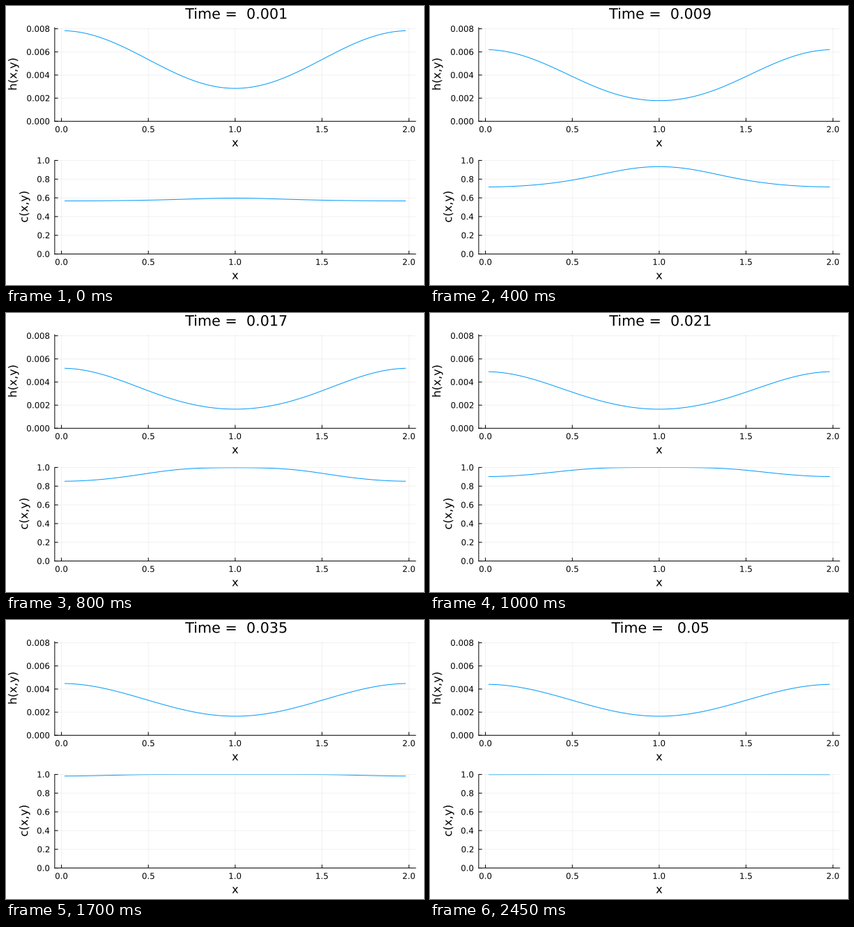
Recreate the animation shown at these times as a matplotlib script. Size 600 by 400 pixels, loop 2.5 s.

```python
import numpy as np
import matplotlib.pyplot as plt
from matplotlib.animation import FuncAnimation
from matplotlib.patches import PathPatch
from matplotlib.path import Path
from matplotlib.textpath import TextPath
from matplotlib.transforms import Affine2D

W, H, DPI = 600, 400, 100
PX = 72 / DPI  # points per pixel
STEPS = 50
RATE, C0, LAG = 0.57e-3, 0.55, 0.35
LEFT, RIGHT = 69.9, 588.0
MIDDLE = (LEFT + RIGHT) / 2
X_MIN, X_MAX = -0.0388, 2.0388
TICK = 4.8

plt.rcParams.update({"font.family": "DejaVu Sans", "path.snap": False})


def evaporate(x):
    """Film height and concentration per step; the solute stays in place."""
    h = 0.0055 + 0.0025 * np.cos(np.pi * x)
    solute = C0 * h
    c = np.full_like(x, C0)
    heights, concs = [], []
    for _ in range(STEPS):
        before = solute / c
        c = c + RATE * (1 - c) * c / h
        h = (1 - LAG) * solute / c + LAG * before
        heights.append(h)
        concs.append(c)
    return heights, concs


fig = plt.figure(figsize=(W / DPI, H / DPI), dpi=DPI, facecolor="white")


def set_label(patch, x, y, s, size, anchor=0.5, angle=0):
    """Outline text on baseline y; anchor 0.5 centres it, 1 aligns it right."""
    path = TextPath((0, 0), s, size=size)
    box = path.get_extents()
    patch.set_path(path)
    patch.set_transform(Affine2D().translate(-box.x0 - anchor * box.width, 0)
                        .rotate_deg(angle).translate(x, H - y))


def label(*args, **kwargs):
    patch = PathPatch(Path([(0, 0)]), facecolor="black", linewidth=0)
    set_label(patch, *args, **kwargs)
    return fig.add_artist(patch)


def panel(top, bottom, ymax, yticks, fmt, name, name_x):
    width, height = RIGHT - LEFT, bottom - top
    xticks = np.arange(0, 2.1, 0.5)
    ax = fig.add_axes([LEFT / W, 1 - bottom / H, width / W, height / H])
    ax.set_facecolor("none")
    ax.set_xticks(xticks)
    ax.set_yticks(yticks)
    ax.tick_params(length=0, labelbottom=False, labelleft=False)
    ax.grid(color="black", alpha=0.055, linewidth=PX)
    ax.set_axisbelow(True)
    ax.spines[["top", "right"]].set_visible(False)
    ax.spines[["left", "bottom"]].set_linewidth(PX)
    ax.vlines(xticks, 0, TICK / height, color="black", linewidth=PX,
              transform=ax.get_xaxis_transform(), clip_on=False)
    ax.hlines(yticks, 0, TICK / width, color="black", linewidth=PX,
              transform=ax.get_yaxis_transform(), clip_on=False)
    line, = ax.plot([], [], color="#009AFA", linewidth=PX)
    line.set_clip_path(Path.unit_rectangle(), ax.transAxes)
    ax.set_xlim(X_MIN, X_MAX)
    ax.set_ylim(0, ymax)

    for v in xticks:
        px = LEFT + (v - X_MIN) / (X_MAX - X_MIN) * width
        label(px, bottom + 15.6, f"{v:.1f}", 11.8)
    for v in yticks:
        label(62.2, bottom - v / ymax * height + 4.3, format(v, fmt), 11.8,
              anchor=1)
    label(MIDDLE, bottom + 36, "x", 16.2)
    label(name_x, (top + bottom) / 2 - 0.6, name, 16.2, angle=90)
    return line


x = np.linspace(0.02, 1.98, 99)
heights, concs = evaporate(x)
h_line = panel(31.0, 165.3, 0.0081, np.arange(5) * 0.002, ".3f", "h(x,y)", 15.2)
c_line = panel(221.4, 355.6, 1.0, np.arange(6) * 0.2, ".1f", "c(x,y)", 31.2)
title = label(0, 0, "Time", 20.7)


def update(i):
    h_line.set_data(x, heights[i])
    c_line.set_data(x, concs[i])
    clock = f"Time = {round((i + 1) / 1000, 3):>6}"
    set_label(title, MIDDLE + 0.9, 18.3, clock, 20.7)
    return h_line, c_line, title


anim = FuncAnimation(fig, update, frames=STEPS, interval=50,
                     init_func=lambda: update(0), repeat=True, repeat_delay=0)
plt.show()
```
